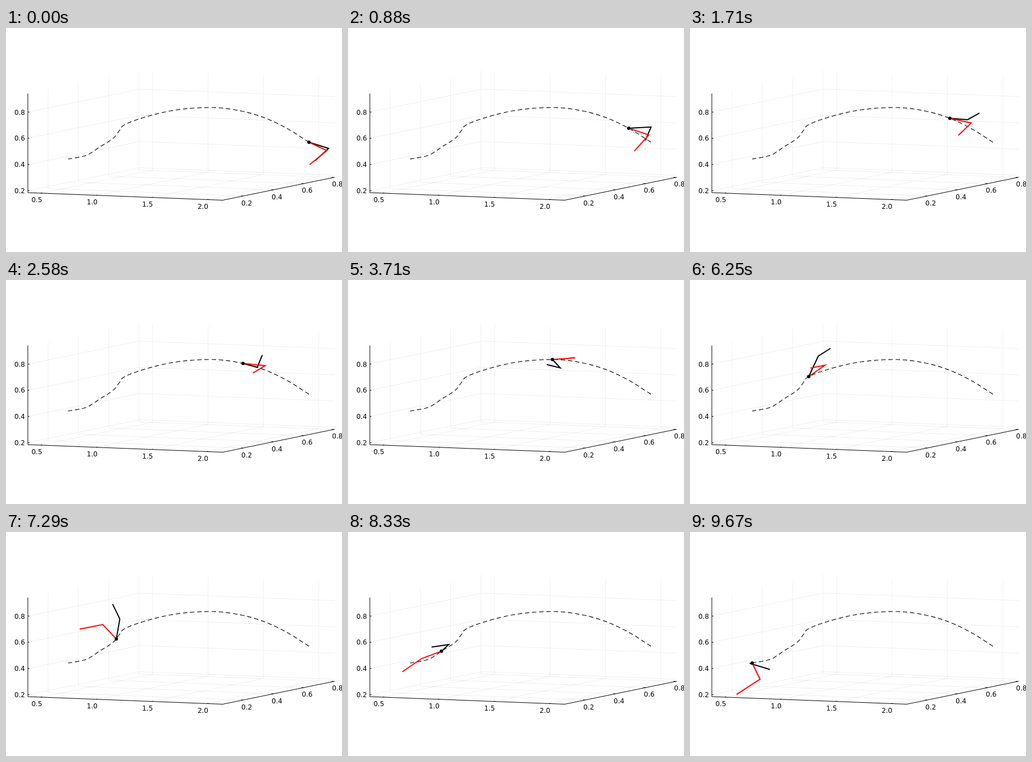
Write an HTML page with a canvas that moves like this. It is 600 px wide and 400 px high and loops after 9710 ms.

```html
<!DOCTYPE html>
<html lang="en">
<head>
<meta charset="utf-8">
<title>Two-legged swing in 3D</title>
<style>
  html, body { margin: 0; width: 100%; height: 100%; overflow: hidden; background: #fff; }
  canvas { display: block; width: 600px; height: 400px; }
</style>
</head>
<body>
<canvas id="stage" width="600" height="400"></canvas>
<script>
const ctx = document.getElementById('stage').getContext('2d');
const LOOP = 9710, FPS = 24, LAST = 232;

// Key points of the hip: seconds, x, y
const hipKeys = [
  [0, 541, 204], [.88, 501, 178.8], [2.58, 423.5, 149], [3.71, 365, 142],
  [5, 286, 149.5], [6.25, 212, 172.5], [7, 201.5, 184.5], [7.4, 195, 193.5],
  [8.33, 167, 212.8], [9, 143, 227.5], [9.667, 111, 234]
];

// Key poses: seconds, thigh angle and length, shin angle and length
const blackKeys = [
  [0, 17.5, 36.7, 137.5, 32.6], [.88, -3, 40, 112.6, 26],
  [2, 8, 29, -60, 24], [2.58, 15.4, 26.4, -67.7, 23.8],
  [3.71, 47, 20.5, -166, 24.7], [4.5, 66, 20, -170, 27],
  [6.25, -65, 40.3, -32.5, 26], [7, -84, 39, -95, 29],
  [8.33, -42.7, 17.7, -188, 31], [9.667, -20, -3, -343, 36]
];
const redKeys = [
  [0, 25, 35.3, 141, 39.8], [.88, 18.4, 38, 132, 39],
  [2.58, 5.8, 39.7, 149, 25.5], [3.71, -4.2, 41, 175.6, 26],
  [6.25, -35, 35.5, 169, 26.5], [7, -110, 35, 172, 42],
  [8.33, -200, 37.3, 145.6, 42.4], [9.667, -296, 32.2, 147, 50]
];

const slope = (keys, i, c) =>
  (keys[i + 1][c] - keys[i][c]) / (keys[i + 1][0] - keys[i][0]);

// Tangent without overshoot
function tangent(keys, i, c) {
  if (i === 0) return slope(keys, 0, c);
  if (i === keys.length - 1) return slope(keys, i - 1, c);
  const a = slope(keys, i - 1, c), b = slope(keys, i, c);
  if (a * b <= 0) return 0;
  const before = keys[i][0] - keys[i - 1][0], after = keys[i + 1][0] - keys[i][0];
  const m = (a * after + b * before) / (before + after);
  return Math.sign(m) * Math.min(Math.abs(m), 3 * Math.abs(a), 3 * Math.abs(b));
}

function sample(keys, t) {
  let i = 0;
  while (i < keys.length - 2 && t >= keys[i + 1][0]) i++;
  const from = keys[i], to = keys[i + 1], span = to[0] - from[0];
  const u = Math.min(1, (t - from[0]) / span), v = 1 - u;
  return from.slice(1).map((value, k) => {
    const c = k + 1;
    return v * v * (1 + 2 * u) * value + u * u * (3 - 2 * u) * to[c]
      + span * u * v * (v * tangent(keys, i, c) - u * tangent(keys, i + 1, c));
  });
}

// Orthographic view of the unit axis box
const project = (a, b, c) =>
  [39 + 348 * a + 200 * b, 294 + 13.5 * a - 41 * b - 177 * c];

function line(points, color, width, dash = []) {
  ctx.beginPath();
  points.forEach(p => ctx.lineTo(...p));
  ctx.strokeStyle = color;
  ctx.lineWidth = width;
  ctx.setLineDash(dash);
  ctx.stroke();
}

// Four evenly spaced ticks on one axis, with grid lines on the two adjoining faces
function drawTicks({ first, step, value, stride, grid, mark, dx, dy, align }) {
  for (let i = 0; i < 4; i++) {
    const at = first + i * step;
    line(grid(at), 'rgba(0,0,0,.065)', 1);
    const [from, to] = mark(at);
    line([from, to], '#000', 1);
    ctx.textAlign = align;
    ctx.fillText((value + i * stride).toFixed(1), from[0] + dx, from[1] + dy);
  }
}

const axes = [
  {
    first: .066, step: .2842, value: .5, stride: .5, dx: -7, dy: 16.5, align: 'center',
    grid: a => [project(a, 0, 0), project(a, 1, 0), project(a, 1, 1)],
    mark: a => [project(a, 0, 0), project(a, .013, 0)]
  },
  {
    first: .181, step: .27, value: .2, stride: .2, dx: 6.7, dy: 16.5, align: 'center',
    grid: b => [project(1, b, 0), project(0, b, 0), project(0, b, 1)],
    mark: b => [project(1, b, 0), project(.99, b, 0)]
  },
  {
    first: .02, step: .2644, value: .2, stride: .2, dx: -5, dy: 4.5, align: 'right',
    grid: c => [project(0, 0, c), project(0, 1, c), project(1, 1, c)],
    mark: c => [project(0, 0, c), project(.008, 0, c)]
  }
];

function drawAxes() {
  ctx.font = '12px "DejaVu Sans", sans-serif';
  ctx.fillStyle = '#000';
  axes.forEach(drawTicks);
  line([project(0, 0, 1), project(0, 0, 0), project(1, 0, 0), project(1, 1, 0)], '#000', 1);
}

const trail = Array.from({ length: LAST + 1 }, (_, n) => sample(hipKeys, n / FPS));

function polar([x, y], degrees, length) {
  const angle = degrees * Math.PI / 180;
  return [x + length * Math.cos(angle), y + length * Math.sin(angle)];
}

function drawLeg(keys, t, hip, color) {
  const [thighAngle, thigh, shinAngle, shin] = sample(keys, t);
  const knee = polar(hip, thighAngle, thigh);
  line([hip, knee, polar(knee, shinAngle, shin)], color, 2);
}

function draw(ms) {
  const step = Math.min(LAST, Math.floor((ms % LOOP + 4.9) * FPS / 1000));
  const t = step / FPS, hip = trail[step];
  ctx.fillStyle = '#fff';
  ctx.fillRect(0, 0, 600, 400);
  drawAxes();
  line(trail, '#000', 1.15, [7.9, 4.93]);
  drawLeg(blackKeys, t, hip, '#000');
  drawLeg(redKeys, t, hip, '#f00');
  ctx.fillStyle = '#000';
  ctx.beginPath();
  ctx.arc(...hip, 3, 0, 2 * Math.PI);
  ctx.fill();
}

const start = performance.now();
function tick() {
  draw(performance.now() - start);
  requestAnimationFrame(tick);
}
tick();
</script>
</body>
</html>
```
